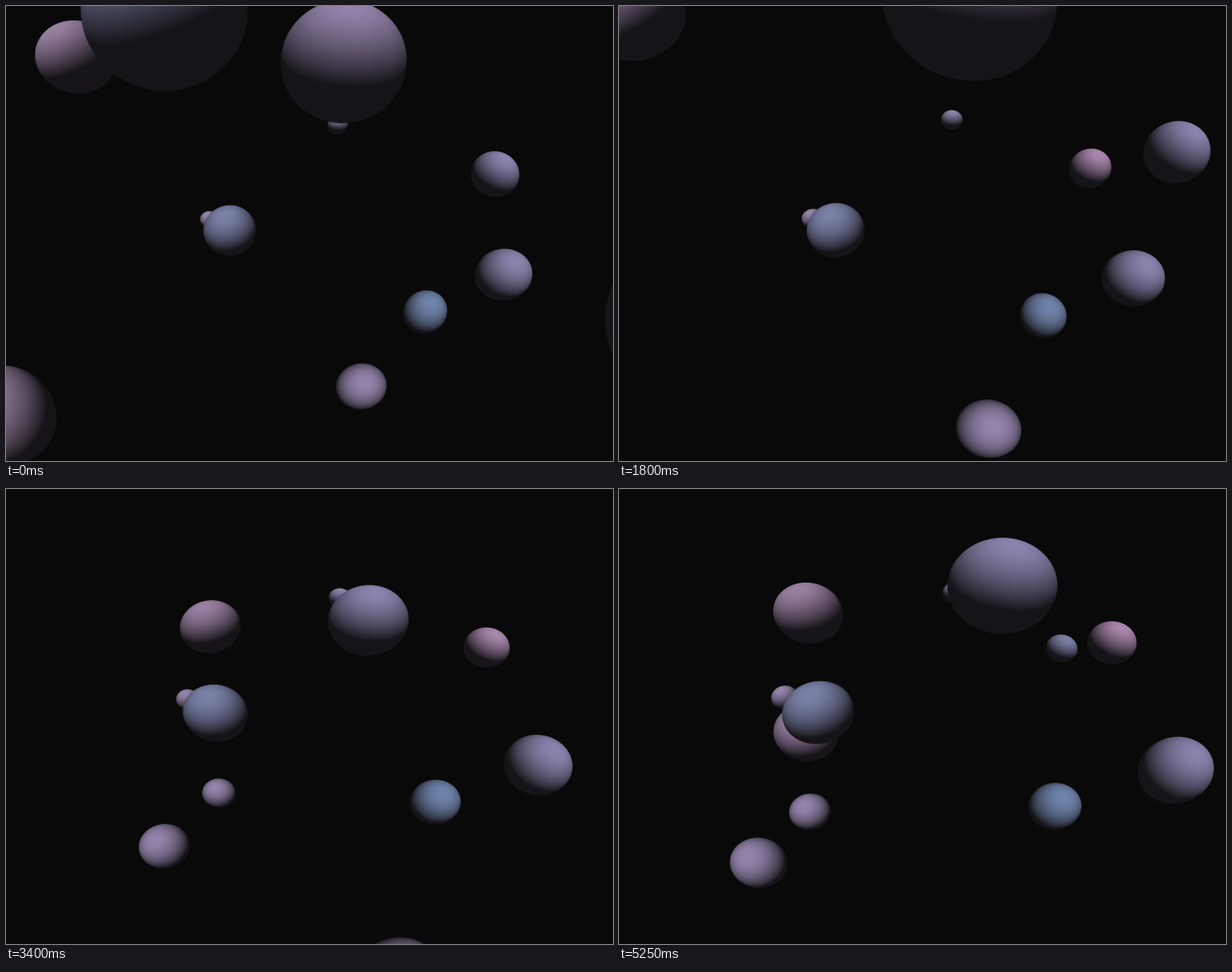
An HTML page with a canvas that plays this animation: 798x598 px, repeating every 5300 ms.

```html
<!DOCTYPE html>
<html lang="en">
<head>
<meta charset="utf-8">
<title>Drifting spheres</title>
<style>
  html, body { margin: 0; width: 100%; height: 100%; overflow: hidden; background: #090909; }
  canvas { display: block; }
</style>
</head>
<body>
<canvas id="stage" width="798" height="598"></canvas>
<script>
const W = 798, H = 598, LOOP = 5300, STEP = 50, GROW = 300;
const FOCAL = H / 2 / Math.tan(37.5 * Math.PI / 180);
const NEAR = 0.51;        // share of the way to the viewer at which a sphere is clipped
const PULSE = 1850;       // period of the squash and stretch
const BACK = 0xff090909, DARK = [22, 20, 24];
const LIGHT = 36 * Math.PI / 180;   // elevation above the viewing axis

const ROSE = [154, 128, 162], PINK = [170, 135, 174], MAUVE = [148, 132, 171];
const VIOLET = [139, 131, 173], SLATE = [122, 129, 167], BLUE = [111, 132, 171];

const sphere = (colour, x, y, radius, arrival, born = -GROW) =>
  ({ colour, x, y, radius, arrival, born });

// Offset from the vanishing point and radius at time 0, then the time of reaching the viewer.
// Listed back to front.
const spheres = [
  sphere(DARK, 516, 113, 123, 6500),
  sphere(ROSE, -401, 239, 67, 6500),
  sphere(ROSE, -307, -232, 51, 9600),
  sphere(SLATE, -191, -294, 108, 3430),
  sphere(VIOLET, 37, -143, 13, 42600),
  sphere(VIOLET, 52, -85, 33.5, 10390, 2200),
  sphere(MAUVE, 45, -226, 82, 6600),
  sphere(SLATE, 135, -66, 14.4, 20000, 4750),
  sphere(PINK, 208, -81, 25.3, 31800, 1200),
  sphere(VIOLET, 244, -78, 31, 6650),
  sphere(VIOLET, 255, 54, 36, 22400),
  sphere(BLUE, 152, 103, 28.7, 41400),
  sphere(MAUVE, 68, 201, 32, 8300),
  sphere(ROSE, -105, -95, 30, 17390, 2250),
  sphere(ROSE, -97.5, 13.6, 25.7, 14460, 3650),
  sphere(MAUVE, -131, -18, 12.2, 19000),
  sphere(SLATE, -105, -4, 34, 22400),
  sphere(MAUVE, -87.5, 74, 15.2, 12840, 3000),
  sphere(MAUVE, -158, 141, 26, 19700, 2950)
];

const ctx = document.getElementById('stage').getContext('2d');
const picture = ctx.createImageData(W, H);
const bytes = picture.data;
const words = new Uint32Array(bytes.buffer);
const clamp = v => Math.max(0, Math.min(1, v));

// One distant light, seen in the frame of the line of sight to (x, y).
function lightAt(x, y) {
  const length = Math.hypot(x, y, FOCAL);
  const a = x / length, b = y / length, c = FOCAL / length, h = Math.hypot(a, c);
  const up = Math.sin(LIGHT), front = Math.cos(LIGHT);
  return {
    across: a * front / h,
    down: (b * c * front - h * h * up) / h,
    toward: b * up + c * front
  };
}

function drawSphere(body, index, t) {
  const progress = t / body.arrival;
  if (t <= body.born || progress > NEAR) return;
  const zoom = 1 / (1 - progress);
  const offsetX = body.x * zoom, offsetY = body.y * zoom;
  const x = W / 2 + offsetX, y = H / 2 + offsetY;
  const radius = body.radius * zoom * (1 - (1 - clamp((t - body.born) / GROW)) ** 2);

  // Symmetric stretch matrix [a b; b c]
  const lag = 0.4 * Math.sin(index * 2.4);
  const stretch = 0.07 * Math.cos(2 * Math.PI * (t - 3400) / PULSE + lag);
  const a = radius * (1 + stretch), c = radius * (1 - stretch);
  const b = radius * 0.03 * Math.sin(t / 700 + index);
  const det = a * c - b * b;
  const { across, down, toward } = lightAt(offsetX, offsetY);

  const halfW = Math.hypot(a, b) + 1, halfH = Math.hypot(b, c) + 1;
  const x0 = Math.max(0, Math.floor(x - halfW)), x1 = Math.min(W, Math.ceil(x + halfW));
  const y0 = Math.max(0, Math.floor(y - halfH)), y1 = Math.min(H, Math.ceil(y + halfH));

  for (let py = y0; py < y1; py++) {
    for (let px = x0; px < x1; px++) {
      const dx = px + 0.5 - x, dy = py + 0.5 - y;
      const u = (c * dx - b * dy) / det, v = (a * dy - b * dx) / det;
      const rho = Math.hypot(u, v);
      const cover = clamp((1 - rho) * radius + 0.5);
      if (!cover) continue;
      const depth = Math.sqrt(Math.max(0, 1 - rho * rho));
      const light = clamp(u * across + v * down + depth * toward);
      const at = (py * W + px) * 4;
      for (let k = 0; k < 3; k++) {
        const shade = DARK[k] + (body.colour[k] - DARK[k]) * light;
        bytes[at + k] += (shade - bytes[at + k]) * cover;
      }
    }
  }
}

function render(t) {
  words.fill(BACK);
  spheres.forEach((body, index) => drawSphere(body, index, t));
  ctx.putImageData(picture, 0, 0);
}

const start = performance.now();
let shown = -1;
function tick() {
  const t = Math.floor((performance.now() - start) % LOOP / STEP) * STEP;
  if (t !== shown) render(shown = t);
  requestAnimationFrame(tick);
}
tick();
</script>
</body>
</html>
```
